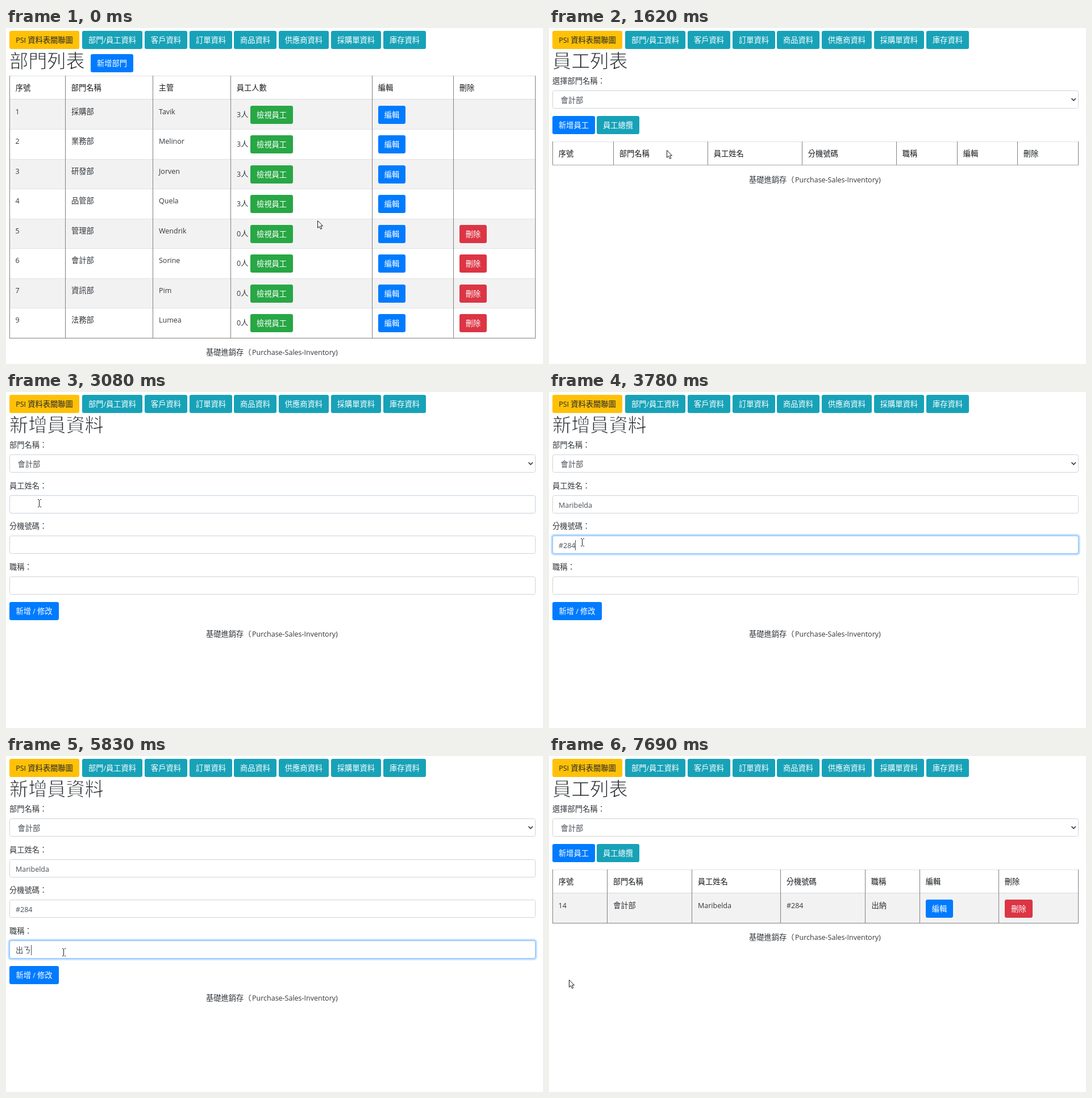
These frames come from a looping animation (945 px wide and 592 px high, 8000 ms). An HTML page:

```html
<!DOCTYPE html>
<html lang="zh-Hant">
<head>
<meta charset="utf-8">
<title>基礎進銷存</title>
<style>
html, body { margin: 0; width: 100%; height: 100%; overflow: hidden; background: #fff; }
svg { display: block; }
text { font: 300 13.25px 'Noto Sans CJK TC', 'Noto Sans CJK JP', 'Noto Sans CJK', sans-serif; fill: #32373c; white-space: pre; }
.latin { font: 400 12.5px 'Open Sans', 'Noto Sans', sans-serif; }
.head { font-weight: 500; fill: #16191c; }
/* A white stroke thins the strokes of the heading. */
.title { font-size: 33.2px; fill: #212529; stroke: #fff; stroke-width: .9px; }
.btn { font-weight: 400; fill: #fff; text-anchor: middle; }
.dark { fill: #212529; }
.field { fill: #495057; }
</style>
</head>
<body>
<svg id="stage" width="945" height="592" viewBox="0 0 945 592"></svg>
<script>
const LOOP = 8000, TICK = 76.85, BOX_H = 32;
const stage = document.getElementById('stage');

function add(parent, tag, attrs) {
  const el = document.createElementNS('http://www.w3.org/2000/svg', tag);
  for (const k in attrs) el.setAttribute(k, attrs[k]);
  parent.appendChild(el);
  return el;
}

// Latin runs use their own font and size.
function setText(el, str) {
  el.textContent = '';
  for (const run of str.match(/[\x20-\x7e]+|[^\x20-\x7e]+/g) || []) {
    add(el, 'tspan', /[\x20-\x7e]/.test(run) ? { class: 'latin' } : {}).textContent = run;
  }
}

function text(g, x, y, str, cls = '') {
  const el = add(g, 'text', { x, y, class: cls });
  setText(el, str);
  return el;
}

function rect(g, x, y, width, height, fill) {
  return add(g, 'rect', { x, y, width, height, fill, 'shape-rendering': 'crispEdges' });
}

const COLORS = {
  warning: ['#ffc107', '#e0a800'],
  info: ['#17a2b8', '#138496'],
  primary: ['#007bff', '#0069d9'],
  success: ['#28a745', '#218838'],
  danger: ['#dc3545', '#c82333']
};
const buttons = [];

function button(g, x, y, w, label, kind) {
  const el = add(g, 'rect', { x, y, width: w, height: BOX_H, rx: 3.3, fill: COLORS[kind][0] });
  text(g, x + w / 2, y + 20.7, label, kind === 'warning' ? 'btn dark' : 'btn');
  const b = { g, x, y, w, kind, el };
  buttons.push(b);
  return b;
}

function halo(g, x, y, w, color, edge) {
  const ring = add(g, 'g', { opacity: 0 });
  add(ring, 'rect', { x: x - 1.3, y: y - 1.3, width: w + 2.6, height: BOX_H + 2.6, rx: 4.6, fill: 'none', stroke: color, 'stroke-width': 2.7 });
  if (edge) add(ring, 'rect', { x: x + .5, y: y + .5, width: w - 1, height: BOX_H - 1, rx: 3, fill: 'none', stroke: edge });
  return ring;
}

function field(g, y, label, value = '', x = 17) {
  text(g, 6, y - 12, label);
  add(g, 'rect', { x: 6.5, y: y + .5, width: 925, height: BOX_H - 1, rx: 3, fill: '#fff', stroke: '#ced4da' });
  const ring = halo(g, 6, y, 926, 'rgba(0,123,255,.25)', '#80bdff');
  return { y, ring, value: text(g, x, y + 21.5, value, 'field') };
}

function select(g, label) {
  field(g, 110, label, '會計部', 20.5);
  add(g, 'path', { d: 'M919.5 124L923.2 127.8L927 124', fill: 'none', stroke: '#333', 'stroke-width': 1.6 });
}

function footer(g, y) {
  text(g, 352, y, '基礎進銷存（');
  text(g, 433, y, 'Purchase-Sales-Inventory)');
}

function table(g, xs, top, heads, rows) {
  const first = top + 42, left = xs[0], right = xs[xs.length - 1], width = right - left;
  const rowY = i => Math.floor(first + i * 52.5);
  const bottom = rowY(rows);
  for (let i = 0; i < rows; i++) {
    if (i % 2 === 0) rect(g, left, rowY(i), width, 52, '#f2f2f2');
    if (i) rect(g, left, rowY(i), width, 1, '#dee2e6');
  }
  rect(g, left, top, width, 1, '#dee2e6');
  rect(g, left, first - 1, width, 1, '#d5d9dd');
  for (const x of xs) rect(g, x, top, 1, bottom - top, '#808080');
  rect(g, left, bottom - (rows ? 0 : 1), width + 1, 1, rows ? '#808080' : '#a8a8a8');
  heads.forEach((h, i) => text(g, xs[i] + 10.7, top + 25.7, h, 'head'));
  return rowY;
}

function page(title) {
  const g = add(stage, 'g', {});
  text(g, 6, 70, title, 'title');
  return g;
}

// Department list
const depts = page('部門列表');
button(depts, 149, 46, 75, '新增部門', 'primary');
const STAFF = ['採購部 Tavik', '業務部 Melinor', '研發部 Jorven', '品管部 Quela',
  '管理部 Wendrik', '會計部 Sorine', '資訊部 Pim', '法務部 Lumea'];
const deptRow = table(depts, [6, 104, 258, 395, 644, 787, 931], 84,
  ['序號', '部門名稱', '主管', '員工人數', '編輯', '刪除'], 8);
let viewBtn;
STAFF.forEach((line, i) => {
  const y = deptRow(i), [dept, boss] = line.split(' ');
  text(depts, 16.5, y + 26, String(i < 7 ? i + 1 : 9));
  text(depts, 115, y + 26, dept);
  text(depts, 269, y + 26, boss);
  text(depts, 406, y + 30.5, (i < 4 ? 3 : 0) + '人');
  const view = button(depts, 430, y + 11, 75, '檢視員工', 'success');
  if (i === 5) viewBtn = view;
  button(depts, 655, y + 11, 48, '編輯', 'primary');
  if (i > 3) button(depts, 798, y + 11, 48, '刪除', 'danger');
});
const viewRing = halo(depts, 430, viewBtn.y, 75, 'rgba(40,167,69,.5)');
footer(depts, 576);

// Employee list, empty and with one row
function staffPage(xs, rows) {
  const g = page('員工列表');
  select(g, '選擇部門名稱：');
  const addBtn = button(g, 6, 155, 75, '新增員工', 'primary');
  button(g, 84, 155, 75, '員工總攬', 'info');
  const rowY = table(g, xs, 200, ['序號', '部門名稱', '員工姓名', '分機號碼', '職稱', '編輯', '刪除'], rows);
  footer(g, rowY(rows) + 30);
  return { g, addBtn };
}
const NAME = 'Maribelda', EXT = '#284';
const empty = staffPage([6, 113, 279, 445, 611, 718, 824, 931], 0);
const addRing = halo(empty.g, 6, 155, 75, 'rgba(0,123,255,.5)');
const filled = staffPage([6, 102, 251, 407, 556, 652, 791, 931], 1);
['14', '會計部', NAME, EXT, '出納'].forEach((s, i) => text(filled.g, [16.5, 113, 262, 418, 567.5][i], 268, s));
button(filled.g, 663, 253, 48, '編輯', 'primary');
button(filled.g, 802, 253, 49, '刪除', 'danger');

// New employee form
const form = page('新增員資料');
select(form, '部門名稱：');
const nameField = field(form, 182, '員工姓名：');
const extField = field(form, 253, '分機號碼：');
const jobField = field(form, 325, '職稱：');
button(form, 6, 370, 87, '新增 / 修改', 'primary');
const saveRing = halo(form, 6, 370, 87, 'rgba(0,123,255,.5)');
footer(form, 431);
const caret = rect(form, 0, 0, 1, 18, '#495057');

// Shared navigation bar
const nav = add(stage, 'g', {});
[[6, 123, 'PSI 資料表關聯圖'], [134, 106, '部門/員工資料'], [244, 75, '客戶資料'], [323, 75, '訂單資料'],
  [401, 75, '商品資料'], [480, 88, '供應商資料'], [572, 88, '採購單資料'], [664, 75, '庫存資料']]
  .forEach(([x, w, s], i) => button(nav, x, 5, w, s, i ? 'info' : 'warning'));

// Pointer
const glow = add(stage, 'circle', { r: 9.5, fill: '#f6f632', 'fill-opacity': .85 });
const pointer = add(stage, 'g', {});
const outline = { fill: '#fff', stroke: '#1a1a1a', 'stroke-width': 1, 'stroke-linejoin': 'round' };
const cursors = {
  arrow: add(pointer, 'path', { d: 'M.5 .5V13.3L3.4 10.6L5.6 15.4L7.8 14.4L5.6 9.8H9.5Z', ...outline }),
  hand: add(pointer, 'path', { d: 'M-1.3 10.5V1.2Q0 -.6 1.3 1.2V6.5Q2.8 5.4 4 7Q5.5 6 6.6 7.7Q8.6 7 8.8 9.4V13L7 18.5H-.3L-4.6 12.2Q-5 9.8 -3 10.2L-1.3 12.2Z', ...outline }),
  beam: add(pointer, 'path', { d: 'M-3 -6.5H-1M1 -6.5H3M-.5 -6V6M-3 6.5H-1M1 6.5H3', fill: 'none', stroke: '#1a1a1a' })
};

const PATH = [
  [0, 548, 339], [60, 548, 339], [300, 556, 368], [540, 575, 412], [690, 568, 427], [870, 530, 425],
  [1010, 472, 419], [1090, 460, 414], [1400, 460, 414], [1690, 140, 162], [1770, 112, 152], [1920, 80, 133],
  [2040, 80, 133], [2310, 58, 176], [2780, 58, 176], [2930, 48, 186], [3070, 59, 196], [3310, 59, 196],
  [3610, 59, 264.5], [4270, 59, 264.5], [4560, 74, 312], [4790, 98, 373], [4990, 102, 345.5],
  [6620, 102, 345.5], [6720, 106, 372], [6800, 92, 402], [6870, 62, 396], [6930, 48, 382],
  [7540, 48, 382], [7690, 35, 394], [8100, 35, 394]
];
const CLICKS = [[1010, 1160], [2550, 2700], [3090, 3240], [5020, 5200], [7320, 7460]];
const CARETS = [
  [3090, 3380, 17, nameField], [3780, 4090, 46, extField], [4600, 4950, 46, extField], [4950, 5350, 17, jobField],
  [5580, 5670, 44, jobField], [5670, 5830, 30, jobField], [5830, 5980, 44, jobField],
  [5980, 6130, 57, jobField], [6130, 7320, 43, jobField]
];
const JOB = [[0, ''], [5580, 'ㄔㄨ'], [5670, '出'], [5830, '出ㄋ'], [5980, '出ㄋㄚ'], [6130, '出納']];
const PAGES = [[0, depts], [1390, empty.g], [2700, form], [7610, filled.g]];

const within = (t, a, b) => t >= a && t < b;
const ramp = (t, a, b) => Math.max(0, Math.min(1, (t - a) / (b - a)));
const latest = (list, t) => list.filter(e => e[0] <= t).pop()[1];

function mouseAt(t) {
  const q = Math.floor(t / TICK) * TICK + 15;
  const i = Math.max(1, PATH.findIndex(p => p[0] > q));
  const a = PATH[i - 1], b = PATH[i], k = (q - a[0]) / (b[0] - a[0]);
  return [a[1] + (b[1] - a[1]) * k, a[2] + (b[2] - a[2]) * k];
}

function show(el, on) { el.style.display = on ? '' : 'none'; }

let shownJob = '';
function draw(t) {
  const current = latest(PAGES, t), [mx, my] = mouseAt(t);
  for (const [, g] of PAGES) show(g, g === current);

  let kind = 'arrow';
  for (const b of buttons) {
    const live = b.g === current || b.g === nav;
    const over = live && mx >= b.x && mx <= b.x + b.w && my >= b.y && my <= b.y + BOX_H;
    if (over) kind = 'hand';
    b.el.setAttribute('fill', COLORS[b.kind][over ? 1 : 0]);
  }
  if (within(t, 1090, 1390)) viewBtn.el.setAttribute('fill', '#1e7e34');
  if (within(t, 2550, 2700)) empty.addBtn.el.setAttribute('fill', '#0062cc');
  if (current === form && [nameField, extField, jobField].some(f => my > f.y && my < f.y + BOX_H)) kind = 'beam';
  if (within(t, 1160, 1400)) kind = 'arrow';

  viewRing.setAttribute('opacity', ramp(t, 1010, 1160));
  addRing.setAttribute('opacity', ramp(t, 2520, 2640));
  nameField.ring.setAttribute('opacity', t < 3780 ? ramp(t, 3070, 3240) : 0);
  extField.ring.setAttribute('opacity', t < 3780 ? 0 : 1 - ramp(t, 5060, 5120));
  jobField.ring.setAttribute('opacity', ramp(t, 5060, 5270) - ramp(t, 7300, 7450));
  saveRing.setAttribute('opacity', ramp(t, 7300, 7450));

  show(nameField.value, t >= 3780);
  show(extField.value, t >= 3780);
  const job = latest(JOB, t);
  if (job !== shownJob) setText(jobField.value, shownJob = job);

  const c = CARETS.find(e => within(t, e[0], e[1]));
  show(caret, c);
  if (c) {
    caret.setAttribute('x', c[2]);
    caret.setAttribute('y', c[3].y + 8);
  }

  show(glow, CLICKS.some(([a, b]) => within(t, a, b)));
  glow.setAttribute('cx', mx - 1.5);
  glow.setAttribute('cy', my - .5);
  pointer.setAttribute('transform', `translate(${Math.round(mx)} ${Math.round(my)})`);
  for (const k in cursors) show(cursors[k], k === kind);
}

setText(nameField.value, NAME);
setText(extField.value, EXT);
const start = performance.now();
function frame() {
  draw((performance.now() - start) % LOOP);
  requestAnimationFrame(frame);
}
frame();
</script>
</body>
</html>
```
